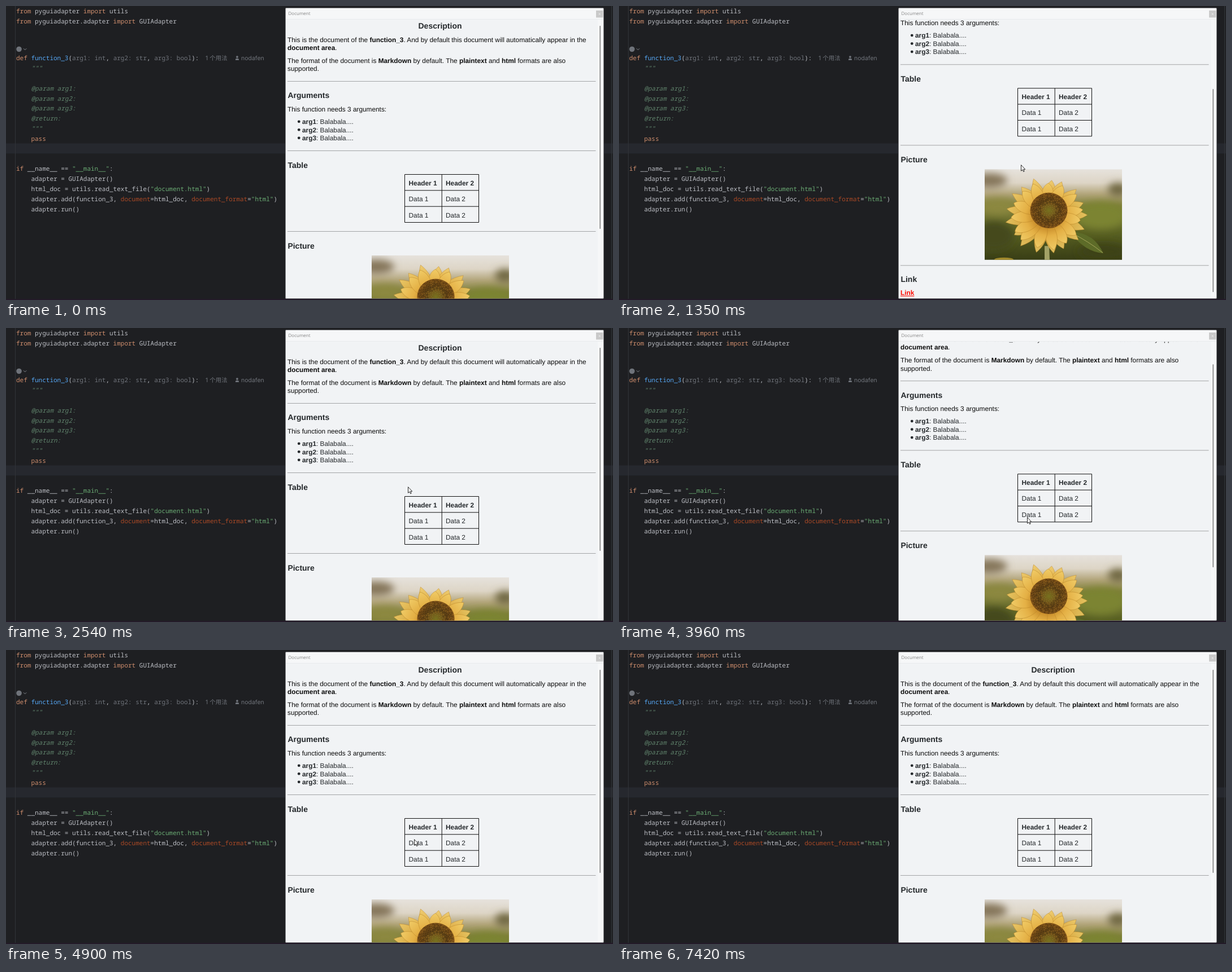
Write an HTML page that moves like this. It is 1074 px wide and 521 px high and loops after 8.08 s.

```html
<!DOCTYPE html>
<html lang="en">
<head>
<meta charset="utf-8">
<title>Document viewer</title>
<style>
@property --s { syntax: "<number>"; inherits: true; initial-value: 0; }
html, body { margin: 0; width: 100%; height: 100%; overflow: hidden; background: #1e1f22; }
svg { display: block; }
text { white-space: pre; text-rendering: geometricPrecision; }

.code { font: 11px "Noto Sans Mono", monospace; fill: #bcbec4; }
.k { fill: #cf8e6d; }
.f { fill: #56a8f5; }
.s { fill: #6aab73; }
.n { fill: #aa4926; }
.g { fill: #6f737a; }
.d { fill: #5f826b; font-style: italic; }
.hint { font: 10.5px Inter, "Noto Sans CJK SC", "Noto Sans CJK", sans-serif; fill: #6f737a; }

.title { font: 8px "Open Sans", sans-serif; fill: #858585; }
.doc { font: 11.85px "Liberation Sans", Arial, sans-serif; fill: #24282b; }
.doc .p { fill: #0c0c0c; }
.b { font-weight: 700; }
.h { font-size: 14px; font-weight: 700; }
.rule { stroke: #a3a4a6; }
.grid { fill: none; stroke: #111; }

.win { animation: wheel 8080ms step-end infinite; }
.page { transform: translateY(calc(var(--s) * -1px)); }
.thumb { transform: translateY(calc(var(--s) * .734px)); }
.cursor { animation: pointer 8080ms step-end infinite; }

@keyframes wheel {
  0% { --s: 0; }
  12.37% { --s: 39.7; }
  13.24% { --s: 79.4; }
  14.85% { --s: 119.1; }
  16.7% { --s: 152.7; }
  28.95% { --s: 113; }
  29.82% { --s: 73.3; }
  30.56% { --s: 33.6; }
  31.43% { --s: 0; }
  49% { --s: 39.7; }
  49.87% { --s: 79.4; }
  50.74% { --s: 119.1; }
  54.82% { --s: 79.4; }
  55.69% { --s: 0; }
  58.16% { --s: 39.7; }
  58.9% { --s: 119.1; }
  60.64%, 100% { --s: 0; }
}
@keyframes pointer {
  0% { transform: translate(671px, 540px); }
  1.6% { transform: translate(671px, 488px); animation-timing-function: steps(4); }
  4.95% { transform: translate(711px, 281px); }
  40.46% { transform: translate(713px, 292px); animation-timing-function: steps(4); }
  43.93% { transform: translate(722px, 335px); }
  67.2% { transform: translate(748px, 322px); animation-timing-function: steps(7); }
  73.14% { transform: translate(1065px, 110px); animation-timing-function: steps(4); }
  76.6% { transform: translate(1047px, 32px); }
  77.47% { transform: translate(1045px, 29px); animation-timing-function: steps(3); }
  80.07% { transform: translate(1039px, 22px); }
  82.54% { transform: translate(1046px, 14px); animation-timing-function: steps(2); }
  84.15% { transform: translate(1049px, 8px); animation-timing-function: steps(8); }
  90.96% { transform: translate(764px, 508px); }
  91.83%, 100% { transform: translate(764px, 540px); }
}
</style>
</head>
<body>
<svg width="1074" height="521" viewBox="0 0 1074 521">
  <defs>
    <clipPath id="view"><rect x="497" y="24.6" width="550" height="493.6"/></clipPath>
    <clipPath id="frame"><rect width="243" height="160.5"/></clipPath>
    <filter id="soft" x="-50%" y="-50%" width="200%" height="200%"><feGaussianBlur stdDeviation="7"/></filter>
    <linearGradient id="field" x2="0" y2="1">
      <stop offset="0" stop-color="#e6e2dc"/>
      <stop offset=".15" stop-color="#ddd5c6"/>
      <stop offset=".27" stop-color="#b3a67c"/>
      <stop offset=".4" stop-color="#7f7f3a"/>
      <stop offset=".7" stop-color="#586022"/>
      <stop offset="1" stop-color="#383d15"/>
    </linearGradient>
    <linearGradient id="petal" x2="0" y2="1">
      <stop offset="0" stop-color="#f0cb66"/>
      <stop offset=".55" stop-color="#e4b045"/>
      <stop offset="1" stop-color="#bd7f1f"/>
    </linearGradient>
    <radialGradient id="disc">
      <stop offset="0" stop-color="#77721f"/>
      <stop offset=".3" stop-color="#74591b"/>
      <stop offset=".6" stop-color="#5c3f14"/>
      <stop offset="1" stop-color="#7b4f17"/>
    </radialGradient>
  </defs>

  <!-- editor -->
  <rect width="1074" height="521" fill="#1e1f22"/>
  <rect y="243.5" width="1074" height="17.8" fill="#26282e"/>
  <path d="M16.5 0V519M1071.5 0V519" stroke="#313438"/>
  <rect y="519" width="1074" height="2" fill="#231a28"/>
  <g class="code">
    <text x="18" y="12.7"><tspan class="k">from</tspan> pyguiadapter <tspan class="k">import</tspan> utils</text>
    <text x="18" y="30.6"><tspan class="k">from</tspan> pyguiadapter.adapter <tspan class="k">import</tspan> GUIAdapter</text>
    <text x="18" y="96"><tspan class="k">def</tspan> <tspan class="f">function_3</tspan>(<tspan class="g">arg1: int</tspan>, <tspan class="g">arg2: str</tspan>, <tspan class="g">arg3: bool</tspan>):</text>
    <g class="d">
      <text x="44.4" y="113.9">"""</text>
      <text x="44.4" y="149.6">@param arg1:</text>
      <text x="44.4" y="167.5">@param arg2:</text>
      <text x="44.4" y="185.3">@param arg3:</text>
      <text x="44.4" y="203.2">@return:</text>
      <text x="44.4" y="221">"""</text>
    </g>
    <text x="44.4" y="238.9" class="k">pass</text>
    <text x="18" y="292.4"><tspan class="k">if</tspan> __name__ == <tspan class="s">"__main__"</tspan>:</text>
    <text x="44.4" y="310.3">adapter = GUIAdapter()</text>
    <text x="44.4" y="328.2">html_doc = utils.read_text_file(<tspan class="s">"document.html"</tspan>)</text>
    <text x="44.4" y="346">adapter.add(function_3, <tspan class="n">document</tspan>=html_doc, <tspan class="n">document_format</tspan>=<tspan class="s">"html"</tspan>)</text>
    <text x="44.4" y="363.9">adapter.run()</text>
  </g>
  <circle cx="23" cy="76.5" r="4.8" fill="#6f737a"/>
  <path d="M31 75.3l2.6 2.6 2.6-2.6" fill="none" stroke="#8a8d93"/>
  <text class="hint" x="353" y="96">1 个用法</text>
  <path d="M406 96v-1.2q0-2 3-2t3 2V96z" fill="#6f737a"/>
  <circle cx="409" cy="90.2" r="1.9" fill="#6f737a"/>
  <text class="hint" x="416" y="96">nodafen</text>

  <!-- document window -->
  <g class="win">
    <rect x="494.5" y="3.5" width="563" height="515" rx="1.5" fill="#f6f7f8" stroke="#77787b"/>
    <rect x="495" y="23" width="552" height="495" fill="#f1f3f5"/>
    <path d="M495 23.5H1057" stroke="#e8eaec"/>
    <text class="title" x="499.5" y="16">Document</text>
    <rect x="1044" y="8" width="12.5" height="12.5" fill="#c9c9c9"/>
    <path d="M1048.8 12.8l3 3m0-3l-3 3" stroke="#eee"/>
    <rect class="thumb" x="1050.4" y="35" width="1.7" height="360" rx=".8" fill="#868686"/>
    <g clip-path="url(#view)">
      <g class="page doc">
        <text class="h" x="768" y="40" text-anchor="middle">Description</text>
        <text class="p" x="498" y="63.5">This is the document of the <tspan class="b">function_3</tspan>. And by default this document will automatically appear in the</text>
        <text class="p" x="498" y="78.2"><tspan class="b">document area</tspan>.</text>
        <text class="p" x="498" y="100.8">The format of the document is <tspan class="b">Markdown</tspan> by default. The <tspan class="b">plaintext</tspan> and <tspan class="b">html</tspan> formats are also</text>
        <text class="p" x="498" y="115.3">supported.</text>
        <path class="rule" d="M498 133.5H1043.5M498 256.5H1043.5M498 399.5H1043.5M498 612.5H1043.5"/>
        <text class="h" x="498.4" y="163.3">Arguments</text>
        <text class="p" x="498" y="186.6">This function needs 3 arguments:</text>
        <circle cx="518.3" cy="204.8" r="2.4"/>
        <circle cx="518.3" cy="219.3" r="2.4"/>
        <circle cx="518.3" cy="233.8" r="2.4"/>
        <text x="524" y="209"><tspan class="b">arg1</tspan>: Balabala....</text>
        <text x="524" y="223.6"><tspan class="b">arg2</tspan>: Balabala....</text>
        <text x="524" y="238.2"><tspan class="b">arg3</tspan>: Balabala....</text>
        <text class="h" x="498.4" y="286.5">Table</text>
        <path class="grid" d="M705.5 298.5H836.5V383.5H705.5zM705.5 326.8H836.5M705.5 355.2H836.5M771.2 298.5V383.5"/>
        <g class="b"><text x="712.5" y="317.6">Header 1</text><text x="778" y="317.6">Header 2</text></g>
        <text x="712.5" y="346.2">Data 1</text><text x="778" y="346.2">Data 2</text>
        <text x="712.5" y="374.6">Data 1</text><text x="778" y="374.6">Data 2</text>
        <text class="h" x="498.4" y="430">Picture</text>
        <g transform="translate(647 442)" clip-path="url(#frame)">
          <rect width="243" height="161" fill="url(#field)"/>
          <g filter="url(#soft)">
            <ellipse cx="8" cy="20" rx="32" ry="13" fill="#85765a"/>
            <ellipse cx="236" cy="36" rx="18" ry="12" fill="#6f6742"/>
            <ellipse cx="205" cy="82" rx="46" ry="24" fill="#7c8432"/>
            <ellipse cx="24" cy="66" rx="34" ry="14" fill="#8c8840"/>
            <ellipse cx="16" cy="118" rx="36" ry="26" fill="#454a1b"/>
            <ellipse cx="210" cy="146" rx="44" ry="15" fill="#3c4216"/>
          </g>
          <ellipse cx="34" cy="160" rx="17" ry="3.5" fill="#a18a2c"/>
          <path d="M106 136h8l1 25h-9z" fill="#a3a266"/>
          <path d="M152 112Q192 110 210 149Q176 146 152 112z" fill="#5d6b28"/>
          <path d="M154 113Q184 128 209 148" fill="none" stroke="#a6a65c"/>
          <g id="petals" transform="translate(109.5 82) scale(1 .94)"/>
          <ellipse cx="113.5" cy="73" rx="33" ry="31.5" fill="url(#disc)"/>
          <g id="seeds" transform="translate(113.5 73)"/>
        </g>
        <text class="h" x="498.4" y="642">Link</text>
        <text class="b" x="498" y="665" fill="#ff0a00" text-decoration="underline">Link</text>
      </g>
    </g>
  </g>

  <path class="cursor" d="M.5.7V11.3L3 9.1 4.6 12.6 6.2 11.9 4.7 8.4H7.7z" fill="#fff" stroke="#111" stroke-width=".9"/>
</svg>
<script>
let seed = 7;
const rand = () => (seed = seed * 16807 % 2147483647) / 2147483647;

function add(id, tag, attrs) {
  const el = document.createElementNS("http://www.w3.org/2000/svg", tag);
  for (const key in attrs) el.setAttribute(key, attrs[key]);
  document.getElementById(id).append(el);
}

// two rings of petals, the back ring longer and darker
for (const [count, length, opacity] of [[17, 67, .9], [15, 60, 1]]) {
  for (let i = 0; i < count; i++) {
    const tip = -length - rand() * 7;
    const turn = (i + rand() * .4) * 360 / count;
    add("petals", "path", {
      d: `M-5-16C-14-34-12-54 0 ${tip}C12-54 13-34 5-16z`,
      transform: `rotate(${turn})`,
      fill: "url(#petal)", stroke: "#b98428", "stroke-width": .5, opacity
    });
  }
}

// seeds along a golden-angle spiral
for (let i = 8; i < 260; i++) {
  const r = 2 * Math.sqrt(i), a = i * 2.39996;
  add("seeds", "circle", {
    cx: r * Math.cos(a), cy: r * .95 * Math.sin(a), r: .7,
    fill: r < 12 ? "#857f2a" : rand() < .6 ? "#38240d" : "#a87424"
  });
}
</script>
</body>
</html>
```
